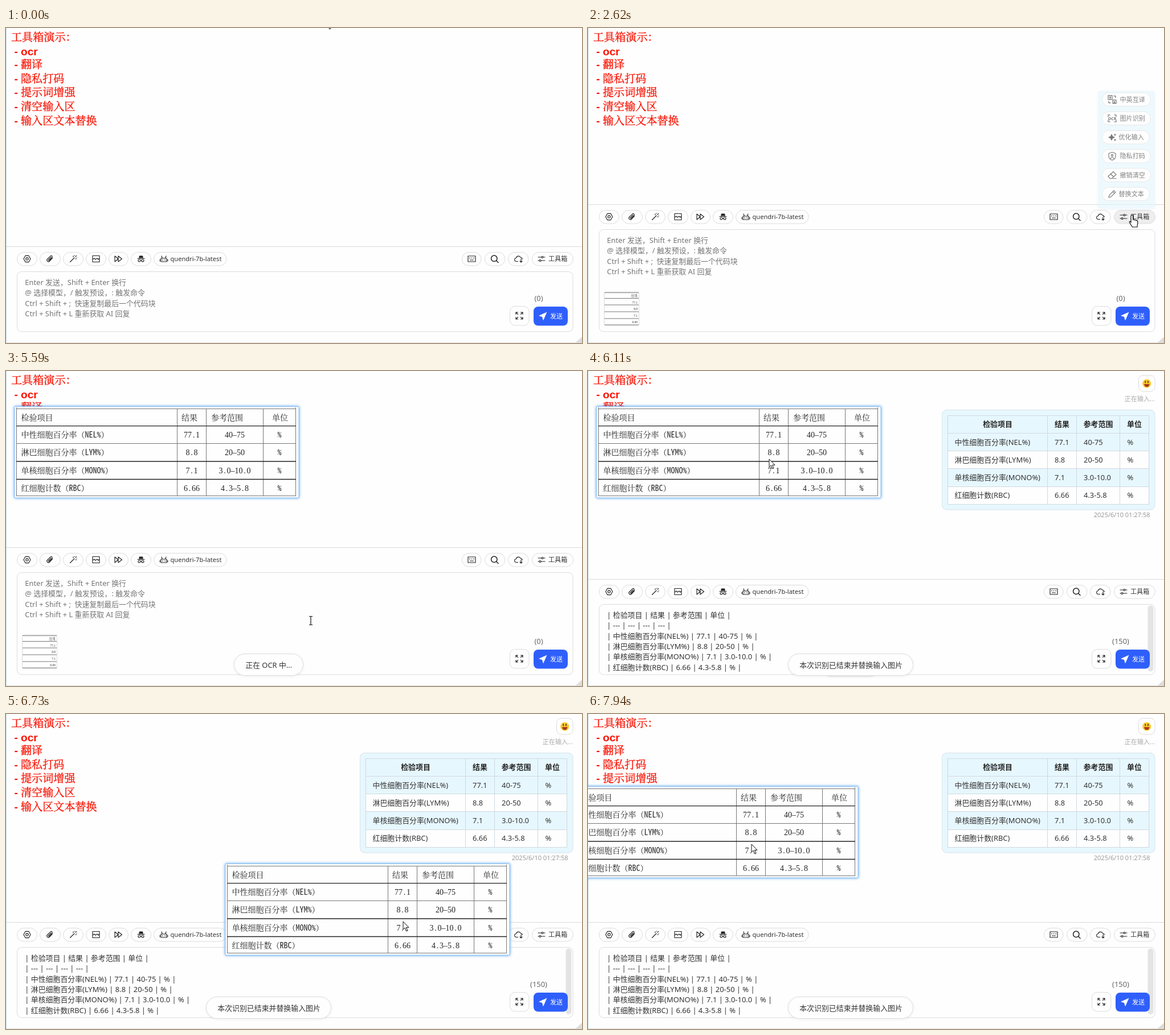
Recreate the animation shown at these times as an HTML page. Size 1011 px wide and 554 px high, loop 7.99 s.

```html
<!DOCTYPE html>
<html lang="zh-CN">
<head>
<meta charset="utf-8">
<style>
html, body { margin: 0; width: 100%; height: 100%; overflow: hidden; background: #fefefe; }
svg { display: block; width: 100%; height: 100%; }
text { font-family: "Noto Sans", "Noto Sans CJK SC", sans-serif; white-space: pre; }
.red { font-family: "Noto Serif CJK SC", "Noto Sans CJK SC", serif; stroke: #fa1405; stroke-width: .35; }
.latin { font-family: "Liberation Sans", sans-serif; font-weight: 700; }
.print { font-family: "Liberation Serif", "Noto Serif CJK SC", "Noto Sans CJK SC", serif; }
.print tspan { font-family: "Noto Sans Mono CJK SC", "Liberation Mono", monospace; }
.icon { fill: none; stroke: #222; stroke-width: 1.15; stroke-linecap: round; stroke-linejoin: round; }
.box { fill: #fefefe; stroke: #dcdcdc; }
.soft { filter: drop-shadow(0 1px 2px #0001); }
.glow { filter: drop-shadow(0 0 2.5px #4a9df0); }
</style>
</head>
<body>
<svg id="stage" viewBox="0 0 1011 554"></svg>
<script>
const LOOP = 7990, SMALL = 11.09, BODY = 12.92;

const rows = [
  ['中性细胞百分率', 'NEL%', '77.1', '40-75'],
  ['淋巴细胞百分率', 'LYM%', '8.8', '20-50'],
  ['单核细胞百分率', 'MONO%', '7.1', '3.0-10.0'],
  ['红细胞计数', 'RBC', '6.66', '4.3-5.8']
];
const head = ['检验项目', '结果', '参考范围', '单位'];
const cells = rows.map(([name, code, value, range]) => [`${name}(${code})`, value, range, '%']);

const text = (x, y, s, size = BODY, fill = '#333', extra = '') =>
  `<text x="${x}" y="${y}" font-size="${size}" fill="${fill}" ${extra}>${s}</text>`;
const rect = (x, y, w, h, r, extra = 'class="box"') =>
  `<rect x="${x}" y="${y}" width="${w}" height="${h}" rx="${r}" ${extra}/>`;
const icon = (x, y, d, extra = '') =>
  `<path class="icon" transform="translate(${x} ${y})" d="${d}" ${extra}/>`;
const lines = (d, color, width = 1) => `<path d="${d}" fill="none" stroke="${color}" stroke-width="${width}"/>`;
const ring = (x, y, r) => `M${x - r} ${y}a${r} ${r} 0 1 0 ${2 * r} 0a${r} ${r} 0 1 0 ${-2 * r} 0`;
const group = (id, body, extra = '') => `<g id="${id}" ${extra}>${body}</g>`;

function heading() {
  const items = ['ocr', '翻译', '隐私打码', '提示词增强', '清空输入区', '输入区文本替换'];
  const red = (x, y, s, kind) => text(x, y, s, 19.1, '#fa1405', `class="${kind}"`);
  return red(9, 23, '工具箱演示：', 'red') +
    items.map((s, i) => {
      const y = i ? 46 + i * 24.8 : 47.5;
      return red(14.5, y, '-', 'latin') + red(26, y, s, i ? 'red' : 'latin');
    }).join('');
}

function toolbar() {
  const tools = [
    [19.5, 35, 37, 'M-3-5.6H3L6 0L3 5.6H-3L-6 0Z' + ring(0, 0, 2.2)],
    [59.5, 36, 77, 'M4.5-1.5L-.5 4a2.6 2.6 0 0 1-4-3.5L1-4.8a1.8 1.8 0 0 1 2.8 2.4L-1 2.6a.8.8 0 0 1-1.3-1.1L2-3'],
    [100.5, 35, 118, 'M-5.5 5.5L2-2M0-5v1.5M5.5-5.5L4-4M2-6v.6M4 0h1.5M6-2h.3'],
    [140.5, 35, 158, 'M-6-5.5H6V5.5H-6ZM-6 1l3-2 2 2 3-2 2 2 2-2'],
    [180.5, 34, 197, 'M-6-5L0 0L-6 5ZM0-5L6.5 0L0 5Z'],
    [219.5, 35, 237, 'M-6-.5H6' + ring(-3, 3, 2) + ring(3, 3, 2) + 'M-1 3H1'],
    [259.5, 127.5, 277, 'M-5-1H5V5H-5ZM-2.5-1L-4-5M2.5-1L4-5M-6.8 1v3M6.8 1v3M-2 1.5v1M2 1.5v1'],
    [800.5, 33.5, 817.5, 'M-6.5-5H6.5V5H-6.5ZM-4-1.5h1M-.5-1.5h1M3-1.5h1M-3 2H3'],
    [840.5, 35.5, 857.5, ring(-.7, -.7, 5.2) + 'M3.2 3.2L6.5 6.5', 'style="stroke-width:1.5"'],
    [881.5, 35.5, 899.5, 'M-1 4.5h-2.5a3 3 0 0 1-.5-6a4 4 0 0 1 7.6-1a3.2 3.2 0 0 1 3 3M4.5 0v6m-2-2l2 2l2-2'],
    [923.5, 72, 940, 'M-6-3H0M3-3H6M-6 3H-4M-1 3H6' + ring(1.5, -3, 1.5) + ring(-2.5, 3, 1.5)]
  ];
  return tools.map(([x, w, cx, d, extra]) =>
      rect(x, 10, w, 23.5, 11.75, `class="box" ${w === 72 ? 'id="toolbox"' : ''}`) + icon(cx, 21.5, d, extra)).join('') +
    '<path d="M234 16h6l1 4h-8z" fill="#222"/>' +
    text(288.5, 25.5, 'quendri-7b-latest', SMALL) + text(952, 25.5, '工具箱', SMALL);
}

function inputArea() {
  const hints = ['Enter 发送，Shift + Enter 换行', '@ 选择模型，/ 触发预设，: 触发命令',
    'Ctrl + Shift + ;  快速复制最后一个代码块', 'Ctrl + Shift + L 重新获取 AI 回复'];
  const markdown = [head, ['---', '---', '---', '---'], ...cells].map(r => `| ${r.join(' | ')} |`);
  const block = (list, color) => list.map((s, i) => text(33.3, 67.1 + i * 18.46, s, BODY, color)).join('');
  return rect(19.5, 44, 975.5, 10, 8, 'id="field" class="box"') +
    group('hints', block(hints, '#757575')) +
    group('markdown', block(markdown, '#333') + rect(982.5, 46, 10, 116, 5, 'fill="#e4e4e4"')) +
    '<path id="caret" d="M33.5 56v16" stroke="#222"/>';
}

function controls() {
  return text(935, 479.5, '', BODY, '#666', 'id="count" text-anchor="middle"') +
    rect(884.5, 489.5, 33.5, 33.5, 9) +
    icon(901, 506, 'M-6-2.5V-6H-2.5M-6-6l3.5 3.5M2.5-6H6V-2.5M6-6L2.5-2.5M6 2.5V6H2.5M6 6L2.5 2.5M-2.5 6H-6V2.5M-6 6l3.5-3.5') +
    rect(926, 490, 60, 33.5, 8, 'fill="#2f5ffb"') +
    '<path d="M949.5 499.5L935 506l6 2 2 6.5Z" fill="#fff"/>' +
    text(955, 511, '发送', SMALL, '#fff');
}

function thumbnail() {
  const ys = [465.5, 475.5, 487, 499, 511, 522];
  return rect(28.5, 463.5, 61, 60, 3) + lines(ys.map(y => `M29 ${y}H89`).join(''), '#777') +
    ['结果', ...rows.map(r => r[2])].map((s, i) =>
      text(87, 473 + i * 11.5, s, 5.5, '#333', 'class="print" text-anchor="end"')).join('');
}

function menu() {
  const items = [
    ['中英互译', 85, 'M-7-7H0V0H-7ZM-5-4h3M-3.5-5v4M1 1H7V7H1ZM3 6l1-3 1 3M3-6H6V-3M-6 3V6H-3'],
    ['', 85, 'M-7-3V-6H-4M4-6H7V-3M7 3V6H4M-4 6H-7V3'],
    ['优化输入', 83, 'M-1-5L.5-1.5 4 0 .5 1.5-1 5-2.5 1.5-6 0-2.5-1.5ZM5-6v3M3.5-4.5h3M5 3v3M3.5 4.5h3', 'style="fill:#222"'],
    ['隐私打码', 85, 'M0-7L6-5V0Q6 5 0 7Q-6 5-6 0V-5Z' + ring(0, -1.5, 1.6) + 'M-3 4Q0 0 3 4'],
    ['撤销清空', 85, 'M-7 2L2-6L7-1L-1 6H-4ZM-3-2L3 3M1 6H7'],
    ['替换文本', 83, 'M-6 6L-5 2L3-6L6-3L-2 5ZM1-4L4-1']
  ];
  return rect(869, 110, 129, 208, 5, 'id="menuBack" class="soft" fill="#e5f6fe"') +
    group('menuItems', items.map(([s, w, d, extra], i) => {
      const y = 125.7 + i * 33.25;
      return rect(877, y - 11.8, w, 23.5, 11.75, `class="box" id="item${i}"`) + icon(894.5, y, d, extra) +
        (i === 1 ? text(894.5, y + 2.7, 'OCR', 7, '#222', 'text-anchor="middle" font-weight="700"') : '') +
        text(w === 83 ? 906 : 908, y + 4, s, SMALL, '#333', `id="label${i}"`);
    }).join(''));
}

function chat() {
  const xs = [643.5, 819, 870, 946.5], mids = [719, 832, 895.5, 959], row = i => 78 + i * 31.3;
  let table = '';
  for (const i of [2, 4]) table += rect(631.5, row(i), 353, 31.3, 0, 'fill="#fefefe"');
  table += lines([0, 1, 2, 3, 4, 5].map(i => `M631.5 ${Math.floor(row(i)) + .5}H984.5`).join('') +
    [631.5, 806.5, 857.5, 933.5, 984.5].map(x => `M${x} 78V235`).join(''), '#cfd9e0');
  table += head.map((s, c) => text(mids[c], 98.2, s, BODY, '#222', 'text-anchor="middle" font-weight="700"')).join('');
  table += cells.map((r, i) => r.map((s, c) => text(xs[c], row(i + 1) + 20.2, s)).join('')).join('');
  return rect(966.5, 7.5, 28.5, 28.5, 8) +
    '<circle cx="980.7" cy="22" r="7.6" fill="#ffc928"/><path d="M976 23h9.5q-.7 5-4.7 5t-4.8-5" fill="#a33b22"/>' +
    '<path d="M978.3 18v2.5M983 18v2.5" stroke="#543" stroke-width="1.8" stroke-linecap="round"/>' +
    text(995, 53, '正在输入...', SMALL, '#aaa', 'text-anchor="end"') +
    rect(621.5, 68.5, 373.5, 175.5, 8, 'fill="#e7f7fe" stroke="#d8e2e8"') + table +
    text(986.5, 257, '2025/6/10 01:27:58', 11, '#999', 'text-anchor="end"');
}

function pinnedTable() {
  const baselines = [87.3, 117.3, 148.3, 180, 211];
  // Fixed pitch: 14 px for a Chinese character, 7 px for a Latin one, each centred in its slot.
  const printed = (x, i, s, centred = true) => {
    const widths = [...s].map(ch => ch < '\x7f' ? 7 : 14);
    let left = centred ? x - widths.reduce((a, b) => a + b) / 2 : x;
    const xs = widths.map(w => (left += w) - w / 2);
    const body = s.replace(/-/g, '–').replace(/[A-Z%]+/g, m => `<tspan>${m}</tspan>`);
    return text(xs.join(' '), baselines[i], body, 14, '#222', 'class="print" text-anchor="middle"');
  };
  return rect(15, 62.5, 499, 160.5, 1, 'fill="#fefefe" stroke="#8cc1f5" class="glow"') +
    lines('M18.5 64V220M300.5 67V220M351.5 67V220M451.5 67V220M508.5 64V220M18 66.5H509M18 127.5H509M18 219.5H509', '#777') +
    lines('M18 96.7H509M18 159H509M18 190.5H509', '#222', 1.3) +
    printed(26.5, 0, head[0], false) + [322, 388, 481].map((x, c) => printed(x, 0, head[c + 1])).join('') +
    rows.map(([name, code, value, range], i) => printed(26.5, i + 1, `${name}（${code}）`, false) +
      printed(326, i + 1, value) + printed(401.5, i + 1, range) + printed(480, i + 1, '%')).join('');
}

const toast = (id, x, w, s) =>
  group(id, rect(x, 497.5, w, 38, 19, 'class="box soft"') + text(x + 19.7, 521.7, s));

document.getElementById('stage').innerHTML =
  rect(0, 0, 1011, 554, 0, 'fill="#fefefe"') + heading() + group('chat', chat()) +
  group('panel', lines('M0 0H1011', '#dadada') + toolbar() + inputArea()) +
  group('thumb', thumbnail()) + controls() +
  lines('M.5 0V553', '#cfe0ec') + lines('M0 553.5H1011', '#ddd') + '<path d="M1011 543V553H1000Z" fill="#ddd"/>' +
  group('menu', menu()) + toast('busy', 400.5, 121, '正在 OCR 中...') +
  toast('done', 351.5, 219, '本次识别已结束并替换输入图片') + group('pin', pinnedTable()) +
  group('cursor',
    '<path id="arrow" d="M0 0V14L3.3 11L5.8 17L8 16L5.6 10.3H10Z" fill="#fff" stroke="#111"/>' +
    '<path id="hand" d="M-2 2a1.8 1.8 0 0 1 3.6 0v6l5.5 1.2q3 .7 2.8 3.5l-1 8.3h-8.5l-5-8q-.5-2 1.2-2l1.4 1.8z" fill="#fff" stroke="#111" stroke-width="1.2"/>' +
    '<path id="beam" d="M-3-7.5H-1L0-6.7L1-7.5H3M0-6.7V6.7M-3 7.5H-1L0 6.7L1 7.5H3" fill="none" stroke="#111" stroke-width="1.2"/>');

const el = Object.fromEntries([...document.querySelectorAll('[id]')].map(e => [e.id, e]));
const set = (id, attrs) => { for (const k in attrs) el[id].setAttribute(k, attrs[k]); };
const show = (id, on) => el[id].setAttribute('opacity', +on);
const ramp = (t, start, length) => Math.min(1, Math.max(0, (t - start) / length));
const smooth = k => k * k * (3 - 2 * k);
const within = (t, a, b) => t >= a && t < b;

// time, x, y and whether the move towards this point is eased
const path = [
  [140, 562, -15], [730, 577, 473, 1], [1370, 577, 473], [1630, 905, 354], [1850, 950, 337], [2190, 955, 332, 1],
  [2600, 955, 332], [2910, 945, 129, 1], [3020, 945, 129], [3500, 948, 157, 1], [3900, 948, 157],
  [4650, 577, 476, 1], [5480, 577, 476], [5590, 535, 440], [6110, 318, 155], [6200, 327, 164], [6290, 337, 188],
  [6730, 697, 365], [6960, 741.5, 368], [7510, 741.5, 368], [7940, 287, 229, 1]
];
function pointer(t) {
  const i = path.findIndex(p => p[0] > t);
  if (i === 0) return path[0].slice(1);
  if (i < 0) return path[path.length - 1].slice(1);
  const [t0, x0, y0] = path[i - 1], [t1, x1, y1, eased] = path[i];
  let k = (t - t0) / (t1 - t0);
  if (eased) k = smooth(k);
  return [x0 + (x1 - x0) * k, y0 + (y1 - y0) * k];
}

function draw(t) {
  const pasted = t >= 1160, finished = t >= 5750, running = t >= 3890;
  const top = finished ? 366 : pasted ? 310 : 384;
  const [x, y] = pointer(t);

  set('panel', { transform: `translate(0 ${top + .5})` });
  set('field', { height: 489.5 - top });
  el.field.style.stroke = within(t, 690, 2260) || within(t, 4720, 5140) ? '#3358f0' : '';
  show('caret', within(t, 690, 1410) || within(t, 1940, 2250));
  show('hints', !finished);
  show('markdown', finished);
  show('chat', finished);
  show('thumb', pasted && !finished);
  el.count.textContent = finished ? '(150)' : '(0)';

  const onToolbox = !finished && x > 923 && y > top + 10 && y < top + 34;
  el.toolbox.style.fill = onToolbox ? '#eee' : '';
  set('menu', { opacity: ramp(t, 2530, 150) * (1 - ramp(t, 4700, 150)) });
  set('menuBack', { x: running ? 869 : 895, width: running ? 129 : 100 });
  set('menuItems', { transform: `translate(${running ? 0 : 25.5} 0)` });
  set('item1', { width: running ? 111 : 85 });
  el.label1.textContent = running ? '正在 OCR 中...' : '图片识别';
  const overMenu = within(t, 2530, 4700) && x > 877 && y > 113 && y < 304;
  for (let i = 0; i < 6; i++) {
    const hover = overMenu && Math.abs(y - 125.7 - i * 33.25) < 12;
    el['item' + i].style.fill = hover || (i === 1 && running) ? '#e5e5e5' : '';
  }

  const rise = smooth(ramp(t, 3890, 350)), push = smooth(ramp(t, 5750, 300));
  const scale = 1 - .19 * push;
  set('busy', {
    opacity: rise * (1 - ramp(t, 6350, 200)),
    transform: `translate(${461 * (1 - scale)} ${38 * (1 - rise) + 538 * (1 - scale) + push})scale(${scale})`
  });
  set('done', { opacity: push, transform: `translate(0 ${38 * (1 - push)})` });

  show('pin', t >= 5540);
  const drag = t >= 6200 ? [x - 327, y - 164] : [0, 0];
  set('pin', { transform: `translate(${drag.map(Math.round).join(' ')})` });

  const beam = t < 6110 && y > top + 46 && x < 995 && x > 20;
  const hand = onToolbox || overMenu;
  show('beam', beam);
  show('hand', hand && !beam);
  show('arrow', !beam && !hand);
  show('cursor', !within(t, 5360, 5500));
  set('cursor', { transform: `translate(${Math.round(x)} ${Math.round(y)})` });
}

const start = performance.now();
function tick() {
  draw((performance.now() - start) % LOOP);
  requestAnimationFrame(tick);
}
tick();
</script>
</body>
</html>
```
